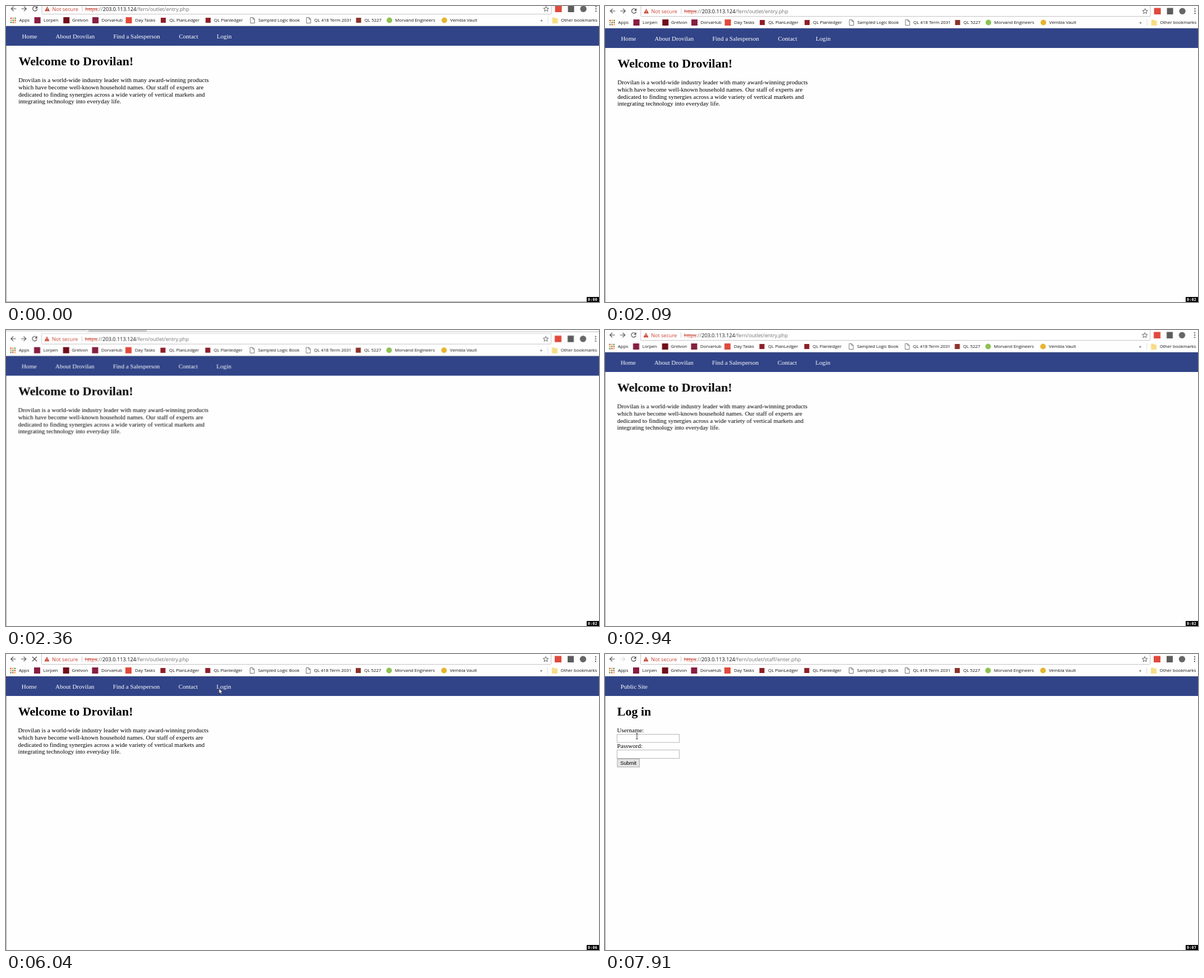
Recreate the animation shown at these times as an HTML page. Size 1058 by 529 pixels, loop 8000 ms.

```html
<!DOCTYPE html>
<html lang="en">
<head>
<meta charset="utf-8">
<title>Login walkthrough</title>
<style>
html, body { margin: 0; width: 100%; height: 100%; overflow: hidden; background: #fefefe; }
svg { display: block; width: 1058px; height: 529px; }
text { white-space: pre; }
.page { font: 11.05px "Liberation Serif", serif; fill: #000; }
.nav { fill: #fff; }
.title { font-size: 22px; font-weight: bold; }
.bar { font: 9.2px "Open Sans", sans-serif; fill: #707070; }
.marks { font: 7.9px "Open Sans", sans-serif; fill: #111; }
.button { font: 9.3px "Liberation Sans", sans-serif; }
.clock { font: bold 7px "DejaVu Sans Mono", monospace; fill: #fff; }
.red { fill: #c84031; }
.strike { fill: #c84031; text-decoration: line-through; }
.host { fill: #111; }
.line { fill: none; stroke: #4a4a4a; stroke-width: 1.2; }

#screen, #arrow, #beam, #digits, .home, .login, .load, .idle, #forward {
  animation: 8s step-end infinite;
}
#screen { animation-name: pan; }
#arrow { animation-name: arrow; }
#beam { animation-name: beam; }
#digits { animation-name: count; }
.home { animation-name: home; }
.login { animation-name: login; }
.load { animation-name: load; }
.idle { animation-name: idle; }
#forward { animation-name: fade; }

@keyframes pan {
  0% { transform: translate(.6px, -4px); }
  26.125% { transform: translate(.6px, 0); }
  27.75% { transform: translate(0, 4px); }
  29.5% { transform: translate(0, 6.6px); }
  36.75%, 100% { transform: none; }
}
@keyframes arrow {
  0% { transform: translate(-50px, -50px); }
  14.5% { transform: translate(406px, 101px); }
  16.25% { transform: translate(403px, 100px); }
  18.25% { transform: translate(-50px, -50px); }
  54% { transform: translate(40px, 58px); }
  55.875% { transform: translate(119px, 94px); }
  57.375% { transform: translate(92px, 76px); }
  59.375% { transform: translate(49px, 67px); }
  61.125% { transform: translate(48px, 68px); }
  62.5% { transform: translate(110px, 85px); }
  64% { transform: translate(210px, 88px); }
  65.375% { transform: translate(310px, 81px); }
  67.25% { transform: translate(345px, 70px); }
  68.875% { transform: translate(378px, 61px); }
  70.625% { transform: translate(380px, 63px); }
  72.125% { transform: translate(379.5px, 61px); }
  82.5% { transform: translate(370px, 42px); }
  84% { transform: translate(363px, 18px); }
  85.5% { transform: translate(370px, 3px); }
  87.375% { transform: translate(350px, 20px); }
  88.75% { transform: translate(260px, 60px); }
  90.25% { transform: translate(160px, 95px); }
  91.75% { transform: translate(90px, 109px); }
  93.625%, 100% { transform: translate(-50px, -50px); }
}
@keyframes beam {
  0% { transform: translate(-50px, -50px); }
  45.75% { transform: translate(147px, 11.5px); }
  47.25% { transform: translate(141px, 11.5px); }
  54% { transform: translate(-50px, -50px); }
  93.625% { transform: translate(31.5px, 173px); }
  95.5% { transform: translate(40px, 166px); }
  97% { transform: translate(49.5px, 160px); }
  98.875%, 100% { transform: translate(57px, 147px); }
}
@keyframes count {
  0% { transform: none; }
  10.875% { transform: translateY(-10px); }
  23.75% { transform: translateY(-20px); }
  38% { transform: translateY(-30px); }
  49% { transform: translateY(-40px); }
  61.125% { transform: translateY(-50px); }
  74% { transform: translateY(-60px); }
  87.375%, 100% { transform: translateY(-70px); }
}
@keyframes home { 0% { visibility: visible; } 79.375%, 100% { visibility: hidden; } }
@keyframes login { 0% { visibility: hidden; } 79.375%, 100% { visibility: visible; } }
@keyframes load { 0% { visibility: hidden; } 74% { visibility: visible; } 79.375%, 100% { visibility: hidden; } }
@keyframes idle { 0% { visibility: visible; } 74% { visibility: hidden; } 79.375%, 100% { visibility: visible; } }
@keyframes fade { 0% { opacity: 1; } 79.375%, 100% { opacity: .2; } }
</style>
</head>
<body>
<svg viewBox="0 0 1058 529" xmlns="http://www.w3.org/2000/svg">
  <defs>
    <clipPath id="window"><rect x="1036" y="520" width="22" height="9"/></clipPath>
    <path id="back" class="line" d="M9 9H17.5M13 4.8L8.8 9L13 13.2"/>
  </defs>
  <rect width="1058" height="529" fill="#fefefe"/>
  <path d="M.5 60V529" stroke="#a2a2a2"/>

  <g id="screen">
    <!-- toolbar -->
    <path d="M-2 -5H143L146 -3.5H1060" fill="none" stroke="#bbb"/>
    <rect x="147" y="-7" width="104" height="3" fill="#ccc"/>
    <use href="#back"/>
    <g id="forward"><use href="#back" transform="translate(44.5) scale(-1 1)"/></g>
    <g class="idle">
      <path class="line" d="M54.2 6.1A4.1 4.1 0 1 0 55.1 10"/>
      <path d="M55.6 4V8.4H51.2Z" fill="#4a4a4a"/>
    </g>
    <path class="line load" d="M47 5L55 13M55 5L47 13"/>
    <rect x="63.5" y="-.5" width="909" height="19" rx="1" fill="#fff" stroke="#c4c4c4"/>
    <path d="M73 4.8L77.5 13.2H68.5Z" fill="#c84031"/>
    <path d="M73 7.5V10.3M73 11.2V12.2" stroke="#fff" stroke-width=".9"/>
    <path d="M135.5 4.5V14" stroke="#ccc"/>
    <g class="bar">
      <text class="red" x="82" y="12.6">Not secure</text>
      <text class="home" x="140.7" y="12.6"><tspan class="strike">https</tspan>://<tspan class="host">203.0.113.124</tspan>/fern/outlet/entry.php</text>
      <text class="login" x="140.7" y="12.6"><tspan class="strike">https</tspan>://<tspan class="host">203.0.113.124</tspan>/fern/outlet/staff/enter.php</text>
    </g>
    <path d="M963 4.6L964.3 7.8L967.7 8L965.1 10.2L965.9 13.5L963 11.7L960.1 13.5L960.9 10.2L958.3 8L961.7 7.8Z" fill="none" stroke="#4a4a4a" stroke-width=".9"/>
    <rect x="979" y="3.5" width="12" height="11.5" fill="#e04a3c"/>
    <rect x="1002" y="3.5" width="11" height="11.5" fill="#5c5c5c"/>
    <circle cx="1029.5" cy="9.2" r="5.7" fill="#666"/>
    <g fill="#4a4a4a">
      <circle cx="1052" cy="5.2" r="1.1"/><circle cx="1052" cy="9.2" r="1.1"/><circle cx="1052" cy="13.2" r="1.1"/>
    </g>

    <!-- bookmarks -->
    <g class="marks" id="marks">
      <text x="953" y="32">»</text>
      <path d="M966.5 24V35" stroke="#ddd"/>
      <path d="M974 24.5H978.5L980 26H984V35H974Z" fill="#f8dc86"/>
      <text x="989.6" y="32.3">Other bookmarks</text>
    </g>
    <path d="M0 39.5H1060" stroke="#d5d5d5"/>

    <!-- page -->
    <rect x="-2" y="40" width="1062" height="35" fill="#314488"/>
    <path d="M-2 532.5H1060" stroke="#a2a2a2"/>
    <g class="page home">
      <g class="nav">
        <text x="27.8" y="61.7">Home</text>
        <text x="88" y="61.7">About Drovilan</text>
        <text x="190.8" y="61.7">Find a Salesperson</text>
        <text x="307.8" y="61.7">Contact</text>
        <text x="375.5" y="61.7">Login</text>
      </g>
      <text class="title" x="21.8" y="110">Welcome to Drovilan!</text>
      <text x="21.6" y="140">Drovilan is a world-wide industry leader with many award-winning products</text>
      <text x="21.6" y="152.8">which have become well-known household names. Our staff of experts are</text>
      <text x="21.6" y="165.6">dedicated to finding synergies across a wide variety of vertical markets and</text>
      <text x="21.6" y="178.4">integrating technology into everyday life.</text>
    </g>
    <g class="page login">
      <text class="nav" x="27.8" y="61.7">Public Site</text>
      <text class="title" x="21.8" y="110">Log in</text>
      <text x="21.6" y="140">Username:</text>
      <rect x="21.5" y="143.5" width="111" height="14.5" fill="#fff" stroke="#b5b5b5"/>
      <text x="21.6" y="168.4">Password:</text>
      <rect x="21.5" y="171.5" width="111" height="15" fill="#fff" stroke="#b5b5b5"/>
      <rect x="22" y="187.5" width="39.5" height="14.5" fill="#e4e4e4" stroke="#aaa"/>
      <text class="button" x="27.2" y="197.7">Submit</text>
    </g>
  </g>

  <path id="arrow" d="M.5 .5V9.8L2.6 7.9L4.1 11.2L5.7 10.5L4.2 7.3H7Z" fill="#fff" stroke="#111" stroke-width=".7"/>
  <path id="beam" d="M-2 -5H-.6L0 -4.4L.6 -5H2M0 -4.4V4.4M-2 5H-.6L0 4.4L.6 5H2" fill="none" stroke="#222" stroke-width=".9"/>

  <g class="clock" clip-path="url(#window)">
    <rect x="1036" y="520" width="22" height="9" fill="#000"/>
    <text x="1038" y="527">0:0</text>
    <g id="digits"></g>
  </g>
</svg>
<script>
const add = (parent, tag, attrs, text = "") => {
  const el = document.createElementNS("http://www.w3.org/2000/svg", tag);
  for (const key in attrs) el.setAttribute(key, attrs[key]);
  el.textContent = text;
  parent.append(el);
};
const marks = document.getElementById("marks");
const icons = {
  square: (x, fill) => add(marks, "rect", { x, y: 24, width: 11, height: 11, fill }),
  small: (x, fill) => add(marks, "rect", { x, y: 25, width: 9, height: 9, fill }),
  dot: (x, fill) => add(marks, "circle", { cx: x + 5.5, cy: 29.5, r: 5, fill }),
  sheet: x => add(marks, "path", {
    d: `M${x + .5} 24.5h4.5l3 3v7h-7.5zM${x + 5} 24.5v3h3`,
    fill: "#fff", stroke: "#666", "stroke-width": .9
  }),
  grid: x => {
    const colors = ["#dc5044", "#e8a33a", "#4a9b5c"];
    for (let i = 0; i < 9; i++)
      add(marks, "rect", {
        x: x + i % 3 * 3.7, y: 24.7 + Math.floor(i / 3) * 3.7,
        width: 2.4, height: 2.4, fill: colors[(i + Math.floor(i / 3)) % 3]
      });
  }
};
[
  ["grid", 7.3, 23, "Apps"],
  ["square", 50, 66.5, "Lorpen", "#861f41"],
  ["square", 101.7, 117.5, "Grelvon", "#700d1a"],
  ["square", 153.5, 170, "DorvaHub", "#861f41"],
  ["square", 213, 230, "Day Tasks", "#e04a3c"],
  ["small", 275.5, 291, "QL PlanLedger", "#8d2028"],
  ["small", 355.5, 370.5, "QL Planledger", "#8d2028"],
  ["sheet", 435, 449.7, "Sampled Logic Book"],
  ["sheet", 535, 549.5, "QL 418 Term 2031"],
  ["small", 624, 639, "QL 5227", "#8c3329"],
  ["dot", 678, 693.7, "Morvand Engineers", "#8cc152"],
  ["dot", 776, 792, "Vembla Vault", "#e6b52e"]
].forEach(([icon, x, textX, label, fill]) => {
  icons[icon](x, fill);
  add(marks, "text", { x: textX, y: 32.3 }, label);
});
const digits = document.getElementById("digits");
for (let i = 0; i < 8; i++) add(digits, "text", { x: 1050.7, y: 527 + i * 10 }, i);
</script>
</body>
</html>
```
